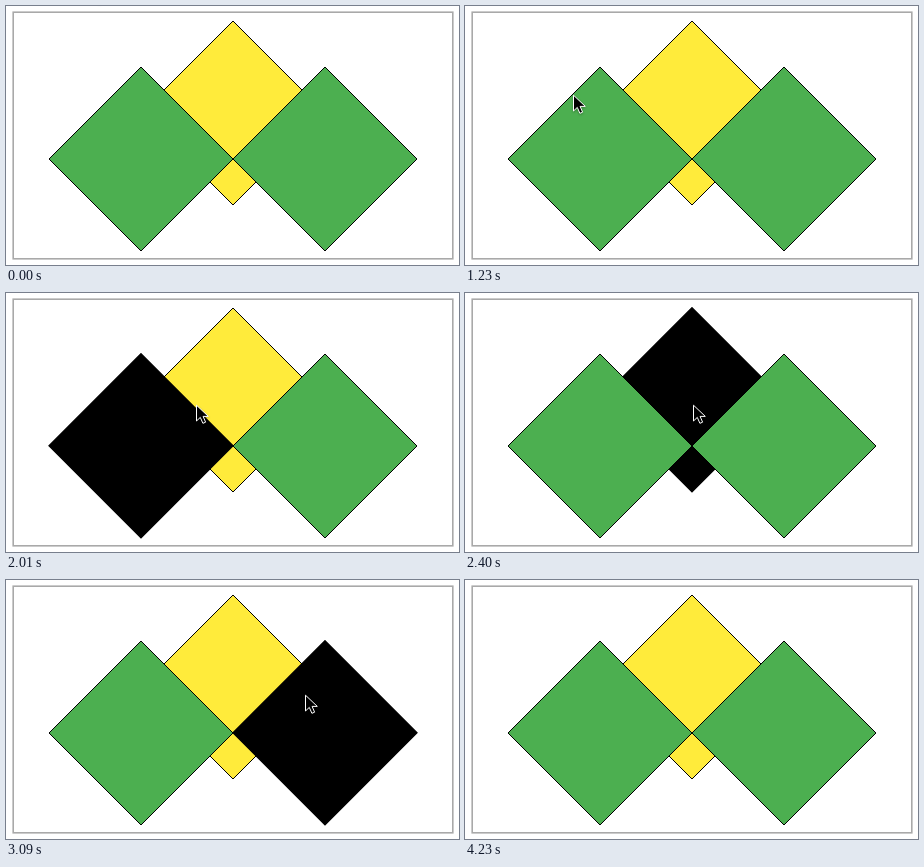
Animation, 453 px wide and 259 px high, one loop 4.62 s. Source, as an HTML page:

```html
<!DOCTYPE html>
<html lang="en">
<head>
<meta charset="utf-8">
<title>Hover diamonds</title>
<style>
  html, body { margin: 0; width: 100%; height: 100%; overflow: hidden; background: #fff; }
  svg { display: block; width: 453px; height: 259px; }
  .frame { fill: #fff; stroke: #a9a9a9; stroke-width: 1.6; }
  .diamond { stroke: #000; stroke-width: 1; }
  .green { fill: #4caf50; }
  .yellow { fill: #ffeb3b; }
  .hover { fill: #000; stroke-width: 1.3; transform: translateY(-.25px); }
  #cursor { fill: #000; stroke: #fff; stroke-width: 1; filter: drop-shadow(0 1px 1px rgba(0, 0, 0, .3)); }
</style>
</head>
<body>
<svg viewBox="0 0 453 259">
  <rect class="frame" x="7.2" y="6.2" width="439.6" height="246.6"/>
  <path class="diamond yellow" d="M227 15l92 92l-92 92l-92-92z"/>
  <path class="diamond green" d="M135 61l92 92l-92 92l-92-92z"/>
  <path class="diamond green" d="M319 61l92 92l-92 92l-92-92z"/>
  <path id="cursor" d="M.5 1.2V17L4.3 13.4L6.9 19.3L9.6 18.2L7.1 12.4H12.3Z"/>
</svg>
<script>
  const LOOP = 4620, STEP = 30, LAG = 50, RADIUS = 92;
  const cursor = document.getElementById('cursor');

  // Topmost diamond first, so that it wins the hit test
  const diamonds = [...document.querySelectorAll('.diamond')].reverse().map(el => {
    const box = el.getBBox();
    return { el, x: box.x + RADIUS, y: box.y + RADIUS };
  });

  // Key points of the pointer, which starts and ends above the stage
  const keys = [
    { t: 270, x: 86, y: -22 },
    { t: 810, x: 94, y: 48 },
    { t: 1320, x: 114, y: 94 },
    { t: 2010, x: 190, y: 111 },
    { t: 2400, x: 228, y: 111 },
    { t: 3090, x: 299, y: 114 },
    { t: 3510, x: 345, y: 75 },
    { t: 3660, x: 342, y: 46 },
    { t: 4230, x: 257, y: -22 }
  ];
  const last = keys.length - 1;

  function slope(i, axis) {
    const a = keys[Math.max(i - 1, 0)], b = keys[Math.min(i + 1, last)];
    return (b[axis] - a[axis]) / (b.t - a.t);
  }

  // Smooth cubic curve through the key points
  function pointer(time) {
    const t = Math.min(Math.max(time, keys[0].t), keys[last].t);
    const i = Math.max(keys.findIndex(key => key.t >= t) - 1, 0);
    const a = keys[i], b = keys[i + 1], span = b.t - a.t;
    const u = (t - a.t) / span, v = 1 - u;
    const along = axis =>
      v * v * (1 + 2 * u) * a[axis] + u * u * (3 - 2 * u) * b[axis] +
      u * v * span * (v * slope(i, axis) - u * slope(i + 1, axis));
    return { x: along('x'), y: along('y') };
  }

  function draw() {
    const t = Math.floor((performance.now() % LOOP) / STEP) * STEP;
    const at = pointer(t), tip = pointer(t - LAG);
    const hit = diamonds.find(d => Math.abs(tip.x - d.x) + Math.abs(tip.y + 1 - d.y) < RADIUS);
    for (const d of diamonds) d.el.classList.toggle('hover', d === hit);
    cursor.setAttribute('transform', `translate(${Math.round(at.x)} ${Math.round(at.y)})`);
    requestAnimationFrame(draw);
  }
  draw();
</script>
</body>
</html>
```
